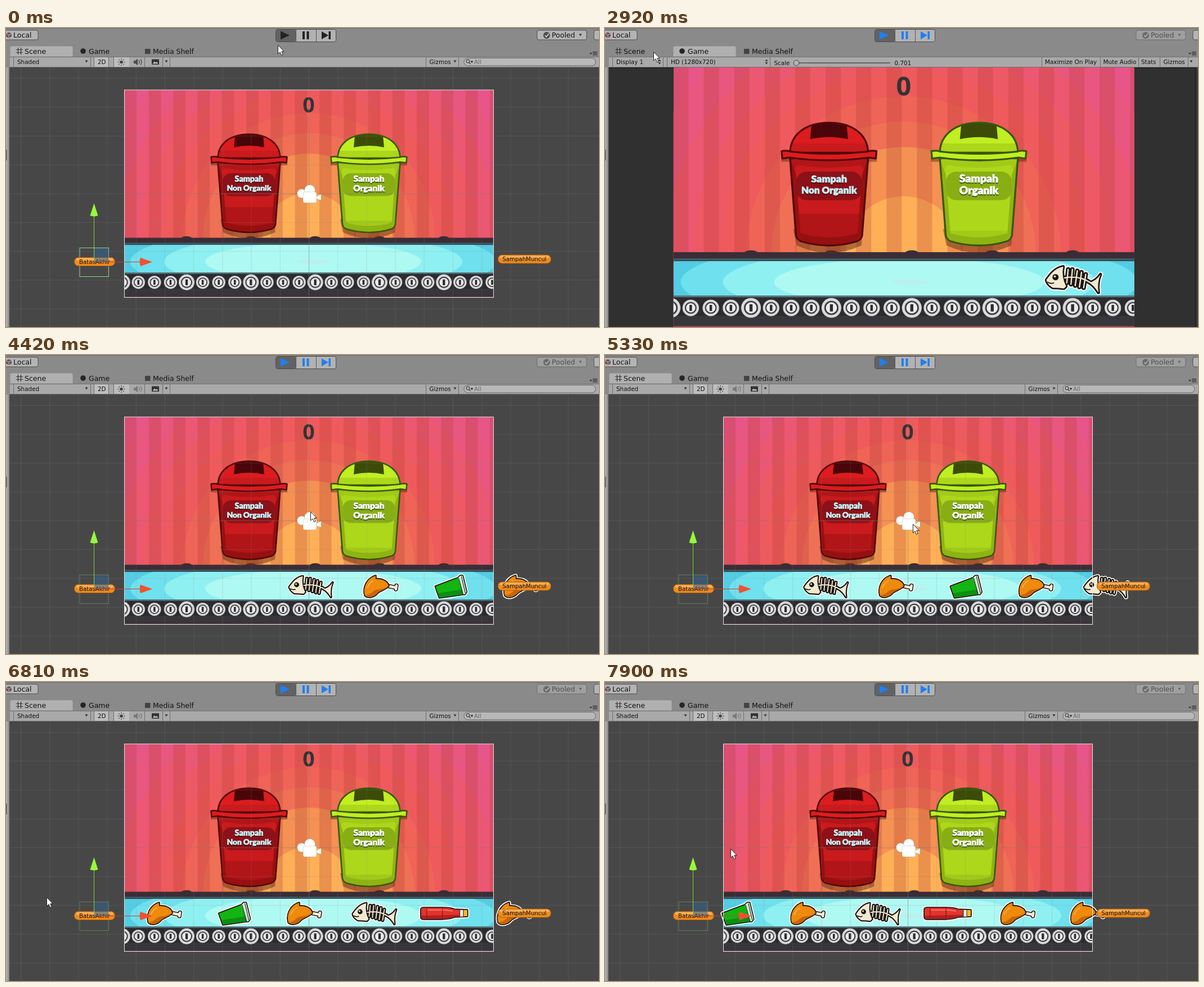
Write an HTML page that moves like this. It is 1054 px wide and 531 px high and loops after 8 s.

```html
<!DOCTYPE html>
<html lang="en">
<head>
<meta charset="utf-8">
<title>Waste sorting game</title>
<style>
  html, body { margin: 0; width: 100%; height: 100%; overflow: hidden; background: #474747; }
  svg { display: block; width: 100vw; height: 100vh; }
  text { font-family: "DejaVu Sans", sans-serif; font-size: 10.4px; fill: #111; }
  .tab { font-size: 12.5px; }
  .bin { font-family: Lato, sans-serif; font-weight: 900; text-anchor: middle; stroke-width: .7; }
  .mid { text-anchor: middle; }
</style>
</head>
<body>
<svg id="stage" viewBox="0 0 1054 531" preserveAspectRatio="none"></svg>
<script>
const LOOP = 8000;

// markup helpers
const rect = (x, y, w, h, fill, more = '') =>
  `<rect x="${x}" y="${y}" width="${w}" height="${h}" fill="${fill}" ${more}/>`;
const circle = (x, y, r, fill, more = '') =>
  `<circle cx="${x}" cy="${y}" r="${r}" fill="${fill}" ${more}/>`;
const path = (d, fill, more = '') => `<path d="${d}" fill="${fill}" ${more}/>`;
const line = (d, color, w = 1, more = '') =>
  path(d, 'none', `stroke="${color}" stroke-width="${w}" ${more}`);
const text = (x, y, s, more = '') => `<text x="${x}" y="${y}" ${more}>${s}</text>`;
const group = (s, more = '') => `<g ${more}>${s}</g>`;
const range = (n, fn) => Array.from({ length: n }, (_, i) => fn(i)).join('');
const down = (x, y) => path(`M${x - 2.5} ${y - 1.5}h5l-2.5 4z`, '#333');
const upDown = (x, y) => path(`M${x - 2.5} ${y - 1}h5l-2.5 -3.5zm0 2h5l-2.5 3.5z`, '#333');
const seps = xs => xs.map(x => line(`M${x}.5 52V69`, '#6d6d6d')).join('');

// ---- playfield, in scene view coordinates ----
function backdrop() {
  const bands = [[385, '#e9567f'], [340, '#ec5772'], [300, '#ee5966'], [262, '#ef5a5c'],
    [224, '#f06357'], [188, '#f07055'], [152, '#f49153'], [82, '#ffb057']];
  return rect(211, 110, 655, 368, '#e85589') +
    bands.map(([r, c]) => circle(538, 375, r, c)).join('') +
    range(16, i => rect(210.6 + 43.3 * i, 110, 21.6, 263, '#b03c30', 'opacity=".27"')) +
    rect(210.4, 373, 656, 106, '#a03e4a');
}

function wheel(i) {
  const x = 206.7 + 28.58 * i, k = i % 4 ? 1 : 1.2;
  return group(circle(0, 0, 11.7, '#d9d9d9') +
    circle(0, 0, 7.5, '#ececec', 'stroke="#3b3b3f" stroke-width="1.800"') +
    line('M0 -4.300V4.300', '#2c2c30', 3.6),
    `transform="translate(${x} 451.6) scale(${k})"`);
}

function belt() {
  const glow = [[325, 62, '#6fe0ed'], [265, 49, '#8ff0f1'], [192, 34, '#aff9f3'], [26, 4, '#bdefec']];
  return rect(211, 372.5, 655, 13, '#3a2d36') +
    range(5, i => `<ellipse cx="${321 + 114.3 * i}" cy="373" rx="9" ry="3.2" fill="#3a2d36"/>`) +
    rect(211, 381.5, 655, 2, '#42636c') + rect(211, 383.5, 655, 2, '#3a4850') +
    rect(211, 385.3, 655, 49, '#53cde4') +
    group(glow.map(([rx, ry, c]) =>
      `<ellipse cx="546" cy="415" rx="${rx}" ry="${ry}" fill="${c}"/>`).join(''), 'clip-path="url(#belt)"') +
    rect(211, 434, 655, 43.3, '#37363b') + rect(211, 434, 655, 2.5, '#55777c') +
    rect(211, 437, 655, 26, '#2c2b30') +
    group(range(24, wheel), 'clip-path="url(#field)"');
}

function bin(cx, c, label) {
  const body = 'M-55.500 239L-47 349Q-46 354 -40 357Q0 369 40 357Q46 354 47 349L55.500 239Z';
  const dome = 'M-55.500 231C-55 206 -34 188.500 0 188.500S55 206 55.500 231Z';
  const rim = 'M-67.500 229Q-60 227.500 -55 229.500Q0 236 55 229.500Q60 227.500 67.500 229L66.500 239.500L56 238Q0 246 -56 238L-66.500 239.500Z';
  const edge = `stroke="${c.edge}" stroke-width="2.6" stroke-linejoin="round"`;
  const caption = ([s, size, y]) => [[1.6, c.edge], [0, c.ink]].map(([dy, ink]) =>
    text(0, y + dy, s, `class="bin" style="font-size:${size}px;fill:${ink};stroke:${ink}"`)).join('');
  return group(
    path('M-51 340L-46 363Q0 384 46 363L51 300Z', '#6b2c14', 'opacity=".5"') +
    path('M-68 238H68V244H-68Z', '#6b2c14', 'opacity=".5"') +
    path(body, c.low) +
    path(`M-53 243Q0 256 53 243L46 ${c.split}H-46Z`, c.mid) +
    path('M-54 241Q0 250 54 241L52 262Q47 247 42 249Q0 256 -42 249Q-47 247 -52 262Z', c.low) +
    path('M-54 243L-47 350L-40 354L-47 262ZM54 243L47 350L40 354L47 262Z', c.side) +
    path('M-43 345Q0 358 43 345L40 356Q0 367 -40 356Z', c.side) +
    path(body, 'none', edge) +
    path(dome, c.top) + path('M-53 218H53L55 231H-55Z', c.mid) +
    path('M-27 212L-25 191Q0 186 25 191L27 212Q0 206 -27 212Z', c.slot) +
    path(dome, 'none', edge) + path(rim, c.top, edge) +
    rect(-47, 258, 94, 40.5, c.plate, 'rx="15"') +
    label.map(caption).join(''),
    `transform="translate(${cx} 0)"`);
}

const RED = { edge: '#520609', low: '#b11518', mid: '#c91a1d', side: '#96100f', top: '#dc1c1f',
  slot: '#4a0508', plate: '#8d1118', ink: '#c9f3f8', split: 318 };
const GREEN = { edge: '#37570a', low: '#a2cb17', mid: '#add71a', side: '#8db413', top: '#c0ee22',
  slot: '#3c4c08', plate: '#89ae14', ink: '#fff', split: 342 };

// ---- waste items, centred on 0,0 with a sticker outline ----
const INK = '#1c1713';
const outline = (d, color, w) => line(d, color, w, 'stroke-linejoin="round" stroke-linecap="round"');
const sticker = (d, fill, detail) =>
  outline(d, '#fff', 7) + outline(d, INK, 3.6) + path(d, fill) + detail;

function fish() {
  const head = 'M-38 1C-33 -6 -26 -16 -14 -18Q-17 -4 -10 10L-13 13Q-22 12 -29 12Q-37 7 -38 1Z';
  const tail = 'M23 5Q33 2 39 -7Q34 5 36 19Q30 9 23 5Z';
  const bones = 'M-12 -2Q8 -6 25 5M-7 -14L-9 5M-1 -14L-3 7M6 -12L3 9M12 -10L9 11M18 -7L15 12';
  const solid = head + tail;
  return outline(solid, '#fff', 7.6) + outline(bones, '#fff', 9.6) +
    outline(solid, INK, 4.4) + outline(bones, INK, 6.4) +
    path(solid, '#f2ead0') + outline(bones, '#f2ead0', 1.9) +
    circle(-25, -3, 4.4, INK) + circle(-26, -4, 1.4, '#fff') +
    line('M-37 4Q-31 7 -27 5', INK, 1.4);
}

function drumstick() {
  const bone = 'M12 -1L26 2M28 -1.5L27 5';
  const meat = 'M-28 16C-32 1 -24 -12 -14 -17L-9 -19L-9 -13C4 -14 13 -8 14 -1C9 6 0 6 -6 12C-11 18 -22 22 -28 16Z';
  return outline(bone, '#fff', 10.5) + outline(meat, '#fff', 7) + outline(bone, INK, 7.5) +
    outline(bone, '#f6eedc', 4.4) + outline(meat, INK, 3.6) + path(meat, '#ee8a0c') +
    path('M-27 15C-18 16 -14 7 -8 6S8 4 13 -1C9 6 0 6 -6 12C-11 18 -22 22 -27 15Z', '#c8650a') +
    line('M-24 3Q-20 -8 -13 -10', '#f9b04a', 2);
}

const cup = () => sticker('M-27 0L13 -15L17 -19L21 -19L28 10L25 14L22 14L-20 20Z', '#12b512',
  path('M-20 20L-22 12L22 5L23 14Z', '#0c8f12') +
  path('M13 -15L17 -19L21 -19L28 10L25 14L22 14Z', '#d5ecd8') +
  line('M14 -15L22 14M19 -18L26 12', INK, 1.1));

const bottle = () => sticker(
  'M-41 -7Q-41 -10 -36 -10L-4 -10Q12 -10 18 -7L41 -6L41 5L18 6Q12 9 -4 10L-36 10Q-41 10 -41 6Z', '#e3342c',
  path('M-41 4L41 2V5L18 6Q12 9 -4 10H-36Q-41 10 -41 6Z', '#b51f1e') +
  line('M-30 -6H-4Q8 -6 15 -4', '#f2746b', 2) + line('M-31 -9V9M-3 -9V9', '#8a1715', 1.2) +
  rect(28, -6, 6, 11.5, '#fff') + rect(34, -6, 7, 11, '#f6b81c') + line('M28 -6V5M34 -6V5', INK, 1));

// draw function and half width, in order of appearance
const FISH = [fish, 42], LEG = [drumstick, 33], CUP = [cup, 30], BOTTLE = [bottle, 44];
const QUEUE = [FISH, LEG, CUP, LEG, FISH, BOTTLE, LEG, LEG];
const GAP = 124.4, SPAWN = 923, LIMIT = 182;

// ---- editor chrome ----
function topBar() {
  return rect(0, 0, 1054, 70, '#8a8a8a') + rect(0, 0, 1054, 1.2, '#707070') +
    rect(-6, 4, 63, 17, '#b4b4b4', 'rx="3" stroke="#4d4d4d"') +
    path('M0 10L5 7.500L10 10V15L5 18L0 15Z', '#6b5555') + line('M0 10L5 12.500L10 10M5 12.500V18', '#c9b4b4') +
    text(13, 17, 'Local', 'class="tab"') +
    rect(479.5, 2.5, 107, 22, '#b2b2b2', 'rx="3" stroke="#4a4a4a"') +
    rect(480, 3, 35, 21, '#626262', 'rx="2"') +
    line('M515.5 3V24M551.5 3V24', '#555') +
    group(path('M488 5.500L504 13L488 20.500ZM527 6h4v14h-4zM534.500 6h4v14h-4zM561 6L573 13L561 20ZM573.500 6h3.500v14h-3.500z', 'currentColor'), 'id="icons"') +
    group(rect(944, 4, 88, 17, '#b4b4b4', 'rx="3" stroke="#4d4d4d"') +
      circle(961, 13, 6, '#4c4c4c') + line('M958 13L960.500 15.500L965 10', '#ddd', 1.6) +
      text(970, 17, 'Pooled', 'class="tab"') + down(1021, 12), 'id="team"') +
    rect(1045, 4, 20, 17, '#b4b4b4', 'rx="3" stroke="#4d4d4d"') +
    path('M1037 44h5l-2.500 3zM1043 42h8v1.200h-8zm0 2.500h8v1.200h-8zm0 2.500h8v1.200h-8z', '#333') +
    group(path('M0 51V35Q0 32 3 32H109Q112 32 112 35V51Z', '#b0b0b0', 'stroke="#868686" stroke-width=".7"'), 'id="tab"') +
    line('M18 38.500H30M18 43.500H30M21.500 35V47M26.500 35V47', '#333', 1.2) +
    text(33, 45.5, 'Scene', 'class="tab"') +
    circle(137, 41, 4.8, '#262626') + text(147, 45.5, 'Game', 'class="tab"') +
    rect(247, 37, 9.5, 9, '#444') + text(261, 45.5, 'Media Shelf', 'class="tab"') +
    rect(7, 51, 1047, 18.5, '#a9a9a9') + line('M7 51.500H1054M7 69.500H1054', '#707070');
}

const sceneBar = () => seps([13, 150, 156, 182, 191, 218, 246, 278, 291, 746, 804]) +
  rect(157, 52, 25, 17, '#bebebe') + rect(192, 52, 27, 17, '#bebebe') +
  text(20, 64, 'Shaded') + down(143, 59) + text(163, 64, '2D') +
  circle(205, 60.5, 2.8, '#444') +
  range(8, i => line('M0 -4.500V-6.500', '#444', 1.3, `transform="translate(205 60.500) rotate(${45 * i})"`)) +
  group(path('M227 58h3l4 -3.500v12l-4 -3.500h-3z', '#333') +
    line('M236 57.500Q238.500 60.500 236 63.500M239 55.500Q243 60.500 239 65.500', '#333', 1.3), 'id="sound"') +
  rect(259, 55.5, 13, 9.5, '#333') + path('M260.500 63.500L264 59.500L266.500 61.500L268 60L270.500 63.500Z', '#bbb') + down(285, 59) +
  text(752.5, 64, 'Gizmos') + down(798, 59) +
  rect(814, 53.5, 234, 13.5, '#b8b8b8', 'rx="6.700" stroke="#666"') +
  circle(821, 59, 2.8, 'none', 'stroke="#444" stroke-width="1.200"') + line('M823 61L825.500 64', '#444', 1.4) +
  down(828, 60) + text(832, 63.5, 'All', 'style="fill:#666"');

const gameBar = () => seps([13, 103, 110, 293, 776, 880, 948, 986, 1036]) +
  text(20, 64, 'Display 1') + upDown(97, 60) + text(117, 64, 'HD (1280x720)') + upDown(287, 60) +
  text(300.5, 65.5, 'Scale') + line('M336 62H507', '#666', 2) +
  circle(340, 62, 4.8, '#b5b5b5', 'stroke="#444"') + text(514.5, 65.5, '0.701') +
  text(782, 64, 'Maximize On Play') + text(885.5, 64, 'Mute Audio') + text(953, 64, 'Stats') +
  text(992.5, 64, 'Gizmos') + down(1042, 59);

const grid = () =>
  line(Array.from({ length: 20 }, (_, i) => `M${26.5 + 51.2 * i} 70V531`).join('') +
    Array.from({ length: 9 }, (_, i) => `M7 ${89.5 + 51.2 * i}H1054`).join(''), '#8a8a8a', 1, 'opacity=".22"') +
  line('M538.500 110V478M211 294.300H866', '#777', 1, 'opacity=".4"');

const pill = (x, y, w, s) =>
  rect(x, y, w, 15, '#ee8b20', 'rx="7" stroke="#a85a0c"') +
  rect(x + 3, y + 1, w - 6, 5, '#f8ad55', 'rx="2.500"') +
  text(x + w / 2, y + 11, s, 'class="mid" style="font-size:10.2px"');

const gizmos = () =>
  rect(210.5, 110, 656, 368.5, 'none', 'stroke="#e4e4e4"') +
  group(circle(525.5, 294, 8, '#fff') + circle(540, 288, 9.5, '#fff') +
    rect(528, 291, 24, 19.5, '#fff', 'rx="3"') + path('M551 300L560 295V306L551 303Z', '#fff'),
    'stroke="#776" stroke-opacity=".35" stroke-width=".8"') +
  rect(131, 390.5, 51.5, 51, 'none', 'id="box"') +
  pill(121.5, 407.5, 72, 'BatasAkhir') + pill(874.5, 403, 94, 'SampahMuncul') +
  rect(157, 392, 25, 23, '#35628c', 'opacity=".55" stroke="#3b6ea5"') +
  line('M156.500 415V332', '#7fd42e') + line('M157 415.500H239', '#c0452c') +
  path('M156.500 311.500L163.500 333Q156.500 336 149.500 333Z', '#96f83a') +
  path('M260 415.500L239 408Q236 415.500 239 423Z', '#f2502f');

// ---- assemble ----
const svg = document.getElementById('stage');
svg.innerHTML =
  `<defs><clipPath id="belt">${rect(211, 385.3, 655, 49, '#000')}</clipPath>
  <clipPath id="field">${rect(210.4, 110, 656, 369, '#000')}</clipPath></defs>` +
  rect(0, 0, 1054, 531, '#474747', 'id="back"') +
  group(group(backdrop(), 'clip-path="url(#field)"') + belt() +
    bin(432, RED, [['Sampah', 14.2, 273], ['Non Organik', 13.6, 289]]) +
    bin(645, GREEN, [['Sampah', 15.4, 273], ['Organik', 15.3, 290]]) +
    text(538, 149.8, '0', 'class="mid" style="font:bold 37.5px \'Open Sans\',sans-serif;fill:#333"') +
    group(grid(), 'id="grid"') +
    QUEUE.map(([draw]) => group(draw(), 'class="item"')).join(''), 'id="art"') +
  group(gizmos(), 'id="gizmos"') +
  group(rect(7, 70, 114.5, 461, '#303030') + rect(941, 70, 113, 461, '#303030') +
    line('M7 71H122M941 71H1050V531', '#252525', 2) + rect(1051, 70, 3, 461, '#3c3c3c'), 'id="sides"') +
  rect(0, 51, 7, 480, '#9a9a9a') + rect(0, 51, 3, 480, '#a9a9a9') + rect(5.5, 51, 1.5, 480, '#555') +
  rect(0, 216, 1.5, 19, '#555') +
  topBar() + group(sceneBar(), 'id="sceneBar"') + group(gameBar(), 'id="gameBar"') +
  group(path('M0 0V15.500L3.600 12.300L6 18L8.700 16.800L6.200 11.300H10.800Z', '#fff', 'stroke="#222" stroke-width="1"'), 'id="cursor"');

const el = id => document.getElementById(id);
const show = (id, on) => el(id).setAttribute('display', on ? 'inline' : 'none');
const set = (node, name, value) => node.setAttribute(name, value);
const items = [...svg.querySelectorAll('.item')];

// ---- timing ----
const BURSTS = [[160, 850, 6], [1120, 1400, 3], [1800, 2770, 8], [2920, 3860, 8],
  [3990, 4930, 8], [5080, 5990, 8], [6140, 7080, 8], [7200, 7900, 6]];
const POINTER = [[0, 483, 30], [160, 455, 42], [850, 226, 143], [1120, 218, 135], [1800, 216, 132],
  [2640, 86, 39], [2770, 86, 42], [3480, 86, 43], [3860, 530, 266], [4930, 552, 290], [5210, 547, 300],
  [5340, 547, 300], [5990, 200, 318], [6810, 72, 381], [7080, 149, 494], [7200, 150, 492], [7900, 223, 296]];
const LEAD = [[1990, 925], [2920, 779], [3470, 687], [5330, 394], [6810, 157], [7900, -13]];

function hold(t) {
  const burst = BURSTS.filter(b => b[0] <= t).pop();
  if (!burst) return 0;
  const [from, to, n] = burst, step = (to - from) / (n - 1);
  return from + step * Math.min(n - 1, Math.floor((t - from + 20) / step));
}

function along(keys, t) {
  let i = keys.findIndex(k => k[0] > t);
  if (i < 0) i = keys.length - 1;
  if (i === 0) i = 1;
  const a = keys[i - 1], b = keys[i], p = Math.min(1, (t - a[0]) / (b[0] - a[0]));
  return a.slice(1).map((v, j) => v + (b[j + 1] - v) * p);
}

function render(time) {
  const t = hold(time), playing = t >= 1120, game = playing && t < 3150;
  set(el('back'), 'fill', game ? '#303030' : '#474747');
  set(el('art'), 'transform', game ? 'translate(122 70) scale(1.25) translate(-211 -110)' : '');
  for (const id of ['grid', 'gizmos', 'sceneBar']) show(id, !game);
  for (const id of ['sides', 'gameBar']) show(id, game);
  set(el('tab'), 'transform', `translate(${game ? 121 : 7} 0)`);
  set(el('icons'), 'color', playing ? '#1f7ff0' : '#222');
  set(el('team'), 'opacity', playing ? 0.5 : 1);
  set(el('sound'), 'opacity', playing ? 0.4 : 0.8);
  set(el('box'), 'stroke', playing ? '#5f7f5c' : '#86d886');

  const [lead] = along(LEAD, t);
  items.forEach((item, i) => {
    const x = lead + GAP * i;
    const live = playing && x <= SPAWN && x - QUEUE[i][1] > LIMIT;
    set(item, 'display', live ? 'inline' : 'none');
    set(item, 'transform', `translate(${x.toFixed(1)} 411)`);
  });

  const [x, y] = along(POINTER, t);
  set(el('cursor'), 'transform', `translate(${Math.round(x) + 0.5} ${Math.round(y) + 0.5})`);
}

const start = performance.now();
function tick() {
  render((performance.now() - start) % LOOP);
  requestAnimationFrame(tick);
}
tick();
</script>
</body>
</html>
```
